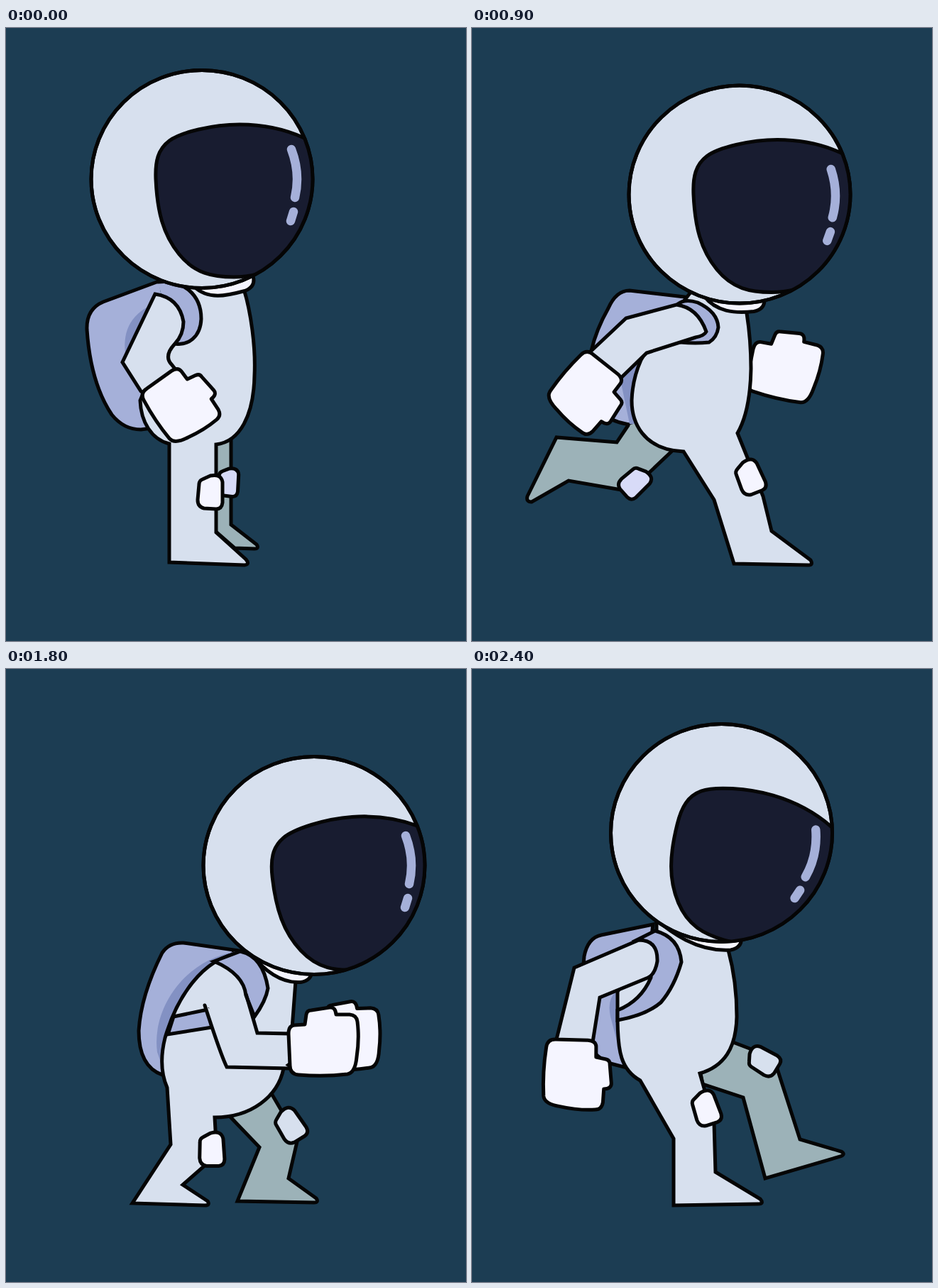
An HTML page that plays this animation: 648x864 px, repeating every 2550 ms.

```html
<!DOCTYPE html>
<html lang="en">
<head>
<meta charset="utf-8">
<title>Running astronaut</title>
<style>
html, body { margin: 0; width: 100%; height: 100%; overflow: hidden; background: #1c3d53; }
svg { display: block; width: 100vw; height: 100vh; }
</style>
</head>
<body>
<svg viewBox="0 0 648 864">
  <defs><clipPath id="dome"><ellipse rx="156" ry="153.5"/></clipPath></defs>
  <g id="man" stroke="#050505" stroke-width="5" stroke-miterlimit="4" stroke-linecap="round"></g>
</svg>
<script>
const STEP = 150;
const SUIT = '#d7e0ee', WHITE = '#f5f5ff', PACK = '#a5b0d9', SHADE = '#8391c3',
      FAR = '#9cb2b8', LILAC = '#d8dbf8', GLASS = '#181c30';

// Shapes around their own centre
const FIST = 'M-50,-15Q-50,-26 -42,-27L-27,-28L-25,-42Q-24,-48 -18,-48L8,-52Q16,-53 17,-42L36,-42Q46,-41 47,-32Q50,-8 46,18Q44,40 33,42Q0,46 -36,43Q-48,42 -48,30Z';
const PAD = 'M-16,-12Q-16,-17 -11,-19L0,-24Q15,-27 17,-15L17,14Q16,23 8,23L-9,22Q-18,20 -18,10Z';
const VISOR = 'M172,-44L144,-58C118,-70 85,-77 53,-77C15,-77 -30,-66 -46,-54C-62,-42 -66,-25 -65,0C-63,45 -55,78 -32,106C-10,133 15,138 45,138Q62,138 78,134L120,150L210,100Z';

// Hanging arm with its strap, and the packs used while running and leaping
const hang = {
  strap: 'M214,358C250,354 275,376 275,410C274,436 256,448 238,445',
  arm: 'M190,512L164,471L210,375Q244,380 250,414Q250,432 238,445Q222,462 233,474L241,484'
};
const lean = {
  pack: 'M300,398L222,402Q200,403 192,430Q172,490 178,545Q188,586 228,591L290,420Z',
  shade: 'M285,408C235,425 200,480 206,540Q208,570 220,588L215,520L240,450Z',
  strap: 'M285,404Q320,400 336,422Q352,448 338,467Q326,480 302,474',
  band: 'M236,459L266,455L260,482L229,487Z'
};
const upright = {
  pack: 'M300,352L215,350Q195,350 185,380Q160,440 165,490Q172,530 212,539L230,480L285,370Z',
  shade: 'M285,355C225,375 205,410 212,460L222,450L240,415Z'
};
const flung = {
  pack: 'M240,299L185,310Q160,316 145,340Q132,400 141,430Q150,480 172,493Q185,499 204,499L220,380Z',
  shade: 'M176,380Q165,420 175,455Q182,480 196,496L195,380Z',
  strap: 'M215,325Q240,300 270,320Q298,345 301,372Q290,408 238,413Q212,412 195,403L197,390Q240,400 262,370L255,330Z'
};
const moved = (set, x, y) =>
  Object.fromEntries(Object.entries(set).map(([k, d]) => [k, [d, x, y]]));

// head: x, y; visor and shine: turn, dx, dy; collar: right end, turn, length; pads and fists: x, y, turn, scale
const stand = {
  head: [276, 213], collar: [50, -9], ...hang,
  pack: 'M215,357L137,386Q113,396 114,425Q119,500 149,545Q166,566 190,566L205,564L230,440',
  shade: 'M210,388Q162,408 168,458L185,425Z',
  farLeg: 'M317,575V700L353,728Q357,734 350,734L322,733L290,705V580',
  body: 'M296,587V711L338,749Q344,756 336,757L230,753V586C205,580 190,555 189,525L212,470L230,340H330L335,368C345,400 352,450 350,490C349,545 330,583 296,587Z',
  pad: [288, 655, 0], farPad: [313, 641, 3, .83], fist: [247, 531, 57, .95]
};
const rise = {
  head: [360, 190], shine: [2.5, 0, 0], collar: [24, 0],
  ...moved(upright, -6, -18), ...moved(hang, 66, -16),
  farLeg: 'M222,515L192,612L132,677L180,754Q186,761 189,750L196,688L258,643L290,555',
  body: 'M335,548L360,615L306,655L300,724Q296,733 292,725L252,642L292,611L262,553C220,545 205,510 207,480C210,430 240,370 282,336L314,317H354L367,356Q377,402 375,447Q374,505 335,548Z',
  pad: [343, 600, -22, .9], farPad: [256, 622, 25, .9], fist: [313, 515, 57, .95]
};
const land = {
  head: [365, 255.5], shine: [0, 4, -2], collar: [32, 0], ...lean,
  farLeg: 'M345,600L380,660L325,721L369,750Q372,756 365,756L250,754Q246,752 249,745L300,655L290,610',
  body: 'M303,617L323,672L227,705L216,754Q213,762 209,756L163,667L241,639L228,592C205,570 208,540 220,510C238,455 252,430 290,402L320,380H360L372,424Q382,465 381,505C380,560 350,616 303,617Z',
  arm: 'M302,544L254,500L283,408Q320,422 317,456Q313,468 302,477V482L338,511',
  pad: [311, 661, -3], farPad: [371, 641, -30, .94], fist: [358, 554, 42, .98]
};
const stride = {
  head: [360, 240], shine: [1, 2, 0], collar: [32, 0], ...moved(lean, -5, -16),
  farLeg: 'M350,570L393,665L405,712L460,751Q464,758 457,758L352,756L322,668L275,590L320,560',
  body: 'M281,600L223,655L112,640L58,671Q47,672 51,662L93,580L182,588L207,562Q200,525 215,494C233,439 247,414 285,386L315,364H355L367,408Q376,445 376,485C374,550 345,600 281,600Z',
  arm: 'M388,532L285,512L274,408Q312,405 322,436L330,474L395,482',
  pad: [204, 647, 40], farPad: [375, 640, -25, .95], fist: [435, 507, 12]
};
const glide = {
  head: [366, 208], shine: [2.5, 0, 0], collar: [24, 0], ...upright,
  farLeg: 'M338,555L368,630L316,671L310,740Q306,748 302,740L262,658L302,627L268,572L280,555',
  body: 'M275,569L238,642L175,689L168,753Q165,763 160,757L109,677L172,619L217,527C205,490 220,450 235,418Q255,380 288,354L320,335H360L373,374Q383,420 381,465C382,540 340,574 275,569Z',
  strap: 'M280,358Q300,350 318,361Q330,372 324,382L316,390',
  band: 'M248,404L268,387V405L233,425Z',
  arm: 'M328,496L274,456L268,375Q275,360 285,361Q315,372 319,392L324,427L362,462',
  pad: [236, 625, 25, .96], farPad: [353, 615, -22, .94], fist: [385, 503, 41, .98]
};
const dip = {
  head: [365, 255], shine: [0, 3, -1], collar: [32, 0], ...lean, arm: [hang.arm, 73, 33],
  farLeg: 'M228,585L241,639L163,667L209,756Q213,762 216,754L227,705L323,672L303,600',
  body: 'M352,600L380,660L325,721L369,750Q372,756 365,756L250,754Q246,752 249,745L285,682L245,604L228,592C205,570 208,540 220,510C238,455 252,430 290,402L320,380H360L372,424Q382,465 381,505Q380,565 352,600Z',
  pad: [371, 641, -30], farPad: [309, 661, -3, .9], fist: [320, 564, 57, .95]
};
const reach = {
  head: [377, 234.5], shine: [2.5, 1, 1], collar: [35, 0],
  pack: 'M308,380L222,370Q203,370 192,395Q175,425 168,455L160,500Q170,556 232,560L300,400Z',
  shade: 'M240,465Q205,485 212,510L222,558L234,560Z',
  farLeg: 'M220,560L204,584L119,577L78,660Q76,668 84,668L136,638L222,653L283,595L240,555',
  body: 'M374,571L410,660L422,709L477,750Q481,757 474,757L369,755L341,665L298,597C240,594 225,555 225,525Q226,495 238,468L255,440L310,370L340,350H380L387,402Q393,440 393,480Q392,540 374,571Z',
  strap: 'M290,389Q300,381 318,387Q346,400 347,422Q345,436 334,443Q315,445 294,443',
  arm: 'M167,456L217,409L288,390Q318,394 330,428Q327,434 315,436L246,458L210,493',
  pad: [392, 634, -25], farPad: [229, 641, 45, .94], fist: [162, 515, 131, .98], farFist: [441, 479, 14]
};
const crouch = {
  head: [434, 277], visor: [-4, 6, 12], shine: [0, 3, 0], collar: [2, 2],
  pack: 'M335,398L250,386Q230,385 220,400Q190,460 187,510Q187,560 220,572L250,480L320,400Z',
  shade: 'M325,398C250,410 205,480 213,540L222,565L230,500L270,440Z',
  farLeg: 'M372,595L411,662L398,718L437,746Q441,752 434,752L326,750L357,674L310,625L360,590',
  body: 'M294,632L297,685L249,727L284,750Q288,756 280,756L178,753L232,670L227,590Q214,560 224,520C240,465 275,408 330,400L360,395L405,420L408,440L402,520V555L391,563C383,603 345,632 294,632Z',
  strap: 'M293,412L330,398Q362,405 369,450Q366,468 350,490L338,460Q335,430 293,412Z',
  band: 'M236,490L284,480L290,505L228,515Z',
  arm: 'M400,563L311,561Q303,545 280,474M338,458L354,513L400,514L354,513Z',
  pad: [290, 678, -4], farPad: [401, 644, -35], fist: [448, 529, 0], farFist: [479, 521, -2],
  farPadFill: SUIT
};
const spring = {
  head: [385, 189], visor: [3, 4, 6], shine: [4, 1, 0], collar: [24, 0],
  ...moved(upright, 19, -19), ...moved(hang, 91, -17),
  farLeg: 'M240,500L205,575L122,628L165,695Q172,705 176,695L185,645L275,600L310,545',
  body: 'M365,528L418,560L378,640L420,672Q424,678 416,679L315,672L345,590L290,553C245,544 230,509 232,479C235,429 265,369 307,335L339,316H379L392,355Q402,401 400,446Q399,500 365,528Z',
  pad: [405, 567, -45], farPad: [264, 588, 35, .94], fist: [338, 514, 57, .95],
  farPadFill: SUIT
};
const leap = {
  head: [327, 170], visor: [8, 3, 8], shine: [8, 0, 0], collar: [38, 0, 125], ...flung,
  farLeg: 'M213,512L182,555L86,538L39,628Q36,638 45,636L105,597L205,612L230,600L282,536L250,520',
  body: 'M350,480L390,483L432,490L481,563L558,555Q566,556 560,561L473,628L392,538H290C235,536 205,520 195,485Q187,430 193,385L240,340V290H330L347,334Q361,385 360,415Q359,450 350,480Z',
  arm: 'M86,381L154,322L250,329Q264,345 264,370Q258,385 246,385L163,380L122,413',
  pad: [411, 489, 88, .96], farPad: [219, 609, 30, .98], fist: [77, 439, 130, .98],
  farPadFill: SUIT
};
const fall = {
  head: [339, 210], visor: [12, 2, 7], shine: [12, 0, 0], collar: [34, 0, 125], ...moved(flung, 12, 40),
  farLeg: 'M222,552L232,625L150,650L185,722Q190,728 193,720L205,685L310,655L300,570',
  body: 'M355,530L405,570L448,670L520,690Q528,695 518,699L400,737L360,630L302,578C247,576 217,560 207,525Q199,470 205,425L252,380V330H342L359,374Q373,425 372,455Q371,495 355,530Z',
  arm: 'M84,421L160,362L262,369Q276,385 276,410Q270,425 258,425L172,420L120,453',
  pad: [407, 585, -30], farPad: [302, 645, 0, .94], fist: [74, 480, 128, .98],
  farPadFill: SUIT
};
const touch = {
  head: [351.5, 231], visor: [16.5, 0, 6], shine: [16.5, 0, 0], collar: [28, 0, 125],
  pack: 'M255,360L182,375Q163,379 158,405L150,500Q165,545 195,556L214,561L250,400Z',
  shade: 'M203,455Q190,465 195,490L203,520L207,490Z',
  farLeg: 'M365,525L425,548L462,663L520,680Q527,684 519,687L413,718L382,604L325,585L320,560',
  body: 'M321,570L341,640L343,709L406,747Q412,754 403,754L284,756V662L237,580C210,565 205,540 205,490V455L260,370V330H340L361,396Q373,440 373,490C372,535 355,560 321,570Z',
  strap: 'M230,383L258,369Q292,378 295,413Q285,448 266,470Q245,488 205,495V481Q238,468 252,435L255,395Z',
  arm: 'M119,522L144,421L235,382Q262,382 261,412Q258,430 248,435L180,463L170,526',
  pad: [330, 620, -21], farPad: [411, 553, -62, .94], fist: [145, 572, 94],
  farPadFill: SUIT
};

const run = [rise, land, stride, glide, dip];
const cycle = [stand, ...run, reach, ...run, crouch, spring, leap, fall, touch];

function part(d, fill, extra = '') {
  if (!d) return '';
  const [path, x, y] = Array.isArray(d) ? d : [d, 0, 0];
  return `<path d="${path}" fill="${fill}" transform="translate(${x} ${y})" ${extra}/>`;
}

function stamp(shape, at, fill) {
  if (!at) return '';
  const [x, y, turn, size = 1] = at;
  return `<path d="${shape}" fill="${fill}" stroke-width="${5 / size}" stroke-linejoin="round" transform="translate(${x} ${y}) rotate(${turn}) scale(${size})"/>`;
}

const spin = ([turn, x, y] = [0, 0, 0]) => `transform="translate(${x} ${y}) rotate(${turn})"`;

// The collar starts on the helmet's rim
function collarPath(end, length) {
  const x = end - length, y = 153.5 * Math.sqrt(1 - (x / 156) ** 2) - 2;
  return `M${x},${y}C${x + length * .2},${y + 22} ${end - length * .5},168 ${end - 15},165Q${end},162 ${end},149`;
}

function head({ head: [x, y], visor, shine, collar: [end, tilt, length = 85] }) {
  return `<g transform="translate(${x} ${y})">
    <path d="${collarPath(end, length)}" fill="${WHITE}" transform="rotate(${tilt})"/>
    <ellipse rx="156" ry="153.5" fill="${SUIT}"/>
    <g clip-path="url(#dome)"><path d="${VISOR}" fill="${GLASS}" ${spin(visor)}/></g>
    <path d="M126,-42Q139,-8 131,26M129,46L125,59" fill="none" stroke="${PACK}" stroke-width="12.5" ${spin(shine)}/>
    <ellipse rx="156" ry="153.5" fill="none"/>
  </g>`;
}

const figure = p =>
  part(p.pack, PACK) + part(p.shade, SHADE, 'stroke="none"') +
  stamp(FIST, p.farFist, WHITE) +
  part(p.farLeg, FAR) + stamp(PAD, p.farPad, p.farPadFill || LILAC) +
  part(p.body, SUIT) + stamp(PAD, p.pad, WHITE) +
  part(p.band, PACK) + part(p.strap, PACK) +
  head(p) +
  part(p.arm, SUIT) + stamp(FIST, p.fist, WHITE);

const man = document.getElementById('man');
let shown = -1;

function draw(now) {
  const i = Math.floor(now / STEP) % cycle.length;
  if (i !== shown) man.innerHTML = figure(cycle[shown = i]);
}

let start;
function tick(now) {
  start ??= now;
  draw(Math.max(0, now - start));
  requestAnimationFrame(tick);
}
draw(0);
requestAnimationFrame(tick);
</script>
</body>
</html>
```
